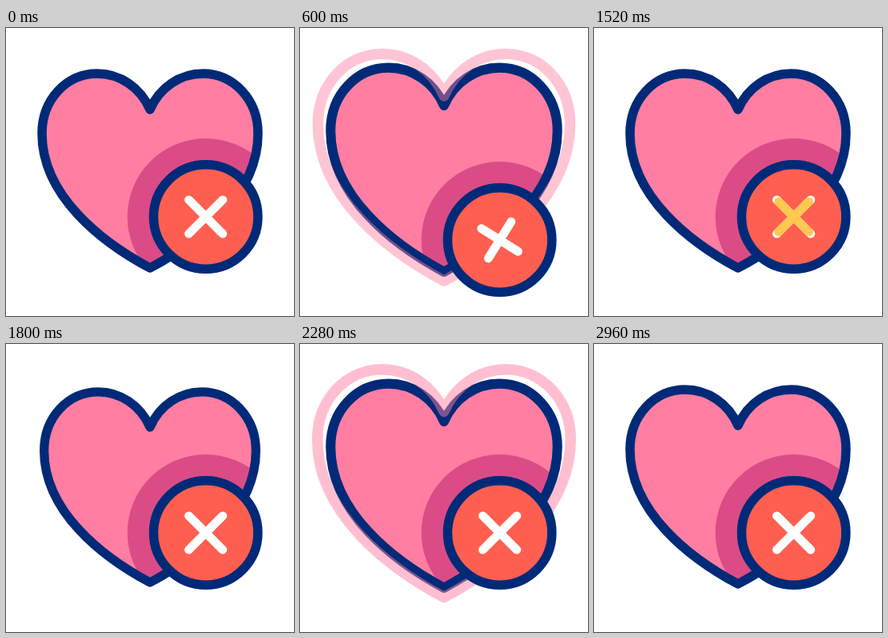
Recreate the animation shown at these times as an HTML page with a canvas. Size 360 px wide and 360 px high, loop 3 s.

```html
<!DOCTYPE html>
<html lang="en">
<head>
<meta charset="utf-8">
<title>Heart with a cross badge</title>
<style>
html, body { margin: 0; width: 100%; height: 100%; overflow: hidden; background: #fff; }
canvas { display: block; width: 360px; height: 360px; }
</style>
</head>
<body>
<canvas id="stage" width="360" height="360"></canvas>
<script>
const LOOP = 3000;
const NAVY = '#002a78', PINK = '#ff7ea1', SHADE = '#db4c86';
const CORAL = '#ff5f50', YELLOW = '#ffc851';
const LINE = 11.5;
const CX = 180, CY = 204;      // centre of the heartbeat
const BX = 249.7, BY = 236;    // badge at rest

const canvas = document.getElementById('stage');
const ctx = canvas.getContext('2d');
const ratio = window.devicePixelRatio || 1;
canvas.width = canvas.height = 360 * ratio;

const heart = new Path2D(
  'M180 102C168 74 142 57 114 57C76 57 45 89 45 132C45 210 120 268 180 300' +
  'C240 268 315 210 315 132C315 89 284 57 246 57C218 57 192 74 180 102Z');

const sine = u => (1 - Math.cos(Math.PI * u)) / 2;
const linear = u => u;

// keys: [time, value] pairs in order of time
function track(keys, t, ease = sine) {
  if (t <= keys[0][0]) return keys[0][1];
  for (let i = 1; i < keys.length; i++) {
    const [t0, a] = keys[i - 1], [t1, b] = keys[i];
    if (t <= t1) return a + (b - a) * ease((t - t0) / (t1 - t0));
  }
  return keys[keys.length - 1][1];
}

const beat = [[40, 1], [320, 0.95], [600, 1.05], [840, 1],
              [1700, 1], [1920, 0.955], [2280, 1.05], [2560, 1]];
const lift = [[40, 0], [320, -32], [600, 29], [840, 0]];
const tilt = [[40, 0], [320, 13], [600, -13], [840, 0]];
const grow = [[40, 1], [320, 1.26], [600, 0.9], [840, 1]];
const flash = [[1180, 0], [1420, 1], [1480, 1], [1700, 0]];

const echoes = [
  { size: [[155, 0.96], [850, 1.25]],
    alpha: [[155, 0], [230, 0.66], [400, 0.63], [560, 0.52], [850, 0]] },
  { size: [[1840, 0.96], [2360, 1.185]],
    alpha: [[1840, 0], [1910, 0.66], [2000, 0.63], [2280, 0.5], [2440, 0]] }
];

function scaled(s, paint) {
  ctx.save();
  ctx.translate(CX, CY);
  ctx.scale(s, s);
  ctx.translate(-CX, -CY);
  paint();
  ctx.restore();
}

function disc(x, y, r) {
  ctx.beginPath();
  ctx.arc(x, y, r, 0, Math.PI * 2);
}

function cross(half, color) {
  ctx.beginPath();
  ctx.moveTo(-half, -half);
  ctx.lineTo(half, half);
  ctx.moveTo(half, -half);
  ctx.lineTo(-half, half);
  ctx.lineWidth = 10.8;
  ctx.strokeStyle = color;
  ctx.stroke();
}

function drawHeart(s, by) {
  ctx.save();
  scaled(s, () => {
    ctx.fillStyle = PINK;
    ctx.fill(heart);
    ctx.clip(heart);
  });
  // The clip is lost with its scale, so mask the shade again here
  const mask = new Path2D();
  mask.addPath(heart, new DOMMatrix([s, 0, 0, s, CX * (1 - s), CY * (1 - s)]));
  ctx.clip(mask);
  disc(BX, by, 98);
  ctx.fillStyle = SHADE;
  ctx.fill();
  ctx.restore();
  scaled(s, () => {
    ctx.lineWidth = LINE;
    ctx.strokeStyle = NAVY;
    ctx.stroke(heart);
  });
}

function drawEcho(echo, t) {
  const alpha = track(echo.alpha, t, linear);
  if (alpha <= 0) return;
  scaled(track(echo.size, t), () => {
    ctx.globalAlpha = alpha;
    ctx.lineWidth = LINE;
    ctx.strokeStyle = PINK;
    ctx.stroke(heart);
  });
}

function drawBadge(t, by) {
  disc(BX, by, 65.2);
  ctx.fillStyle = CORAL;
  ctx.fill();
  ctx.lineWidth = LINE;
  ctx.strokeStyle = NAVY;
  ctx.stroke();

  ctx.save();
  ctx.translate(BX, by);
  ctx.rotate(track(tilt, t) * Math.PI / 180);
  const half = 21.2 * track(grow, t);
  cross(half, '#fff');
  const f = track(flash, t);
  if (f > 0) cross(half * f * 0.97, YELLOW);
  ctx.restore();
}

function draw(t) {
  ctx.setTransform(ratio, 0, 0, ratio, 0, 0);
  ctx.fillStyle = '#fff';
  ctx.fillRect(0, 0, 360, 360);
  ctx.lineCap = ctx.lineJoin = 'round';
  const by = BY + track(lift, t);
  drawHeart(track(beat, t), by);
  echoes.forEach(echo => drawEcho(echo, t));
  drawBadge(t, by);
}

const start = performance.now();
function tick() {
  draw((performance.now() - start) % LOOP);
  requestAnimationFrame(tick);
}
tick();
</script>
</body>
</html>
```
